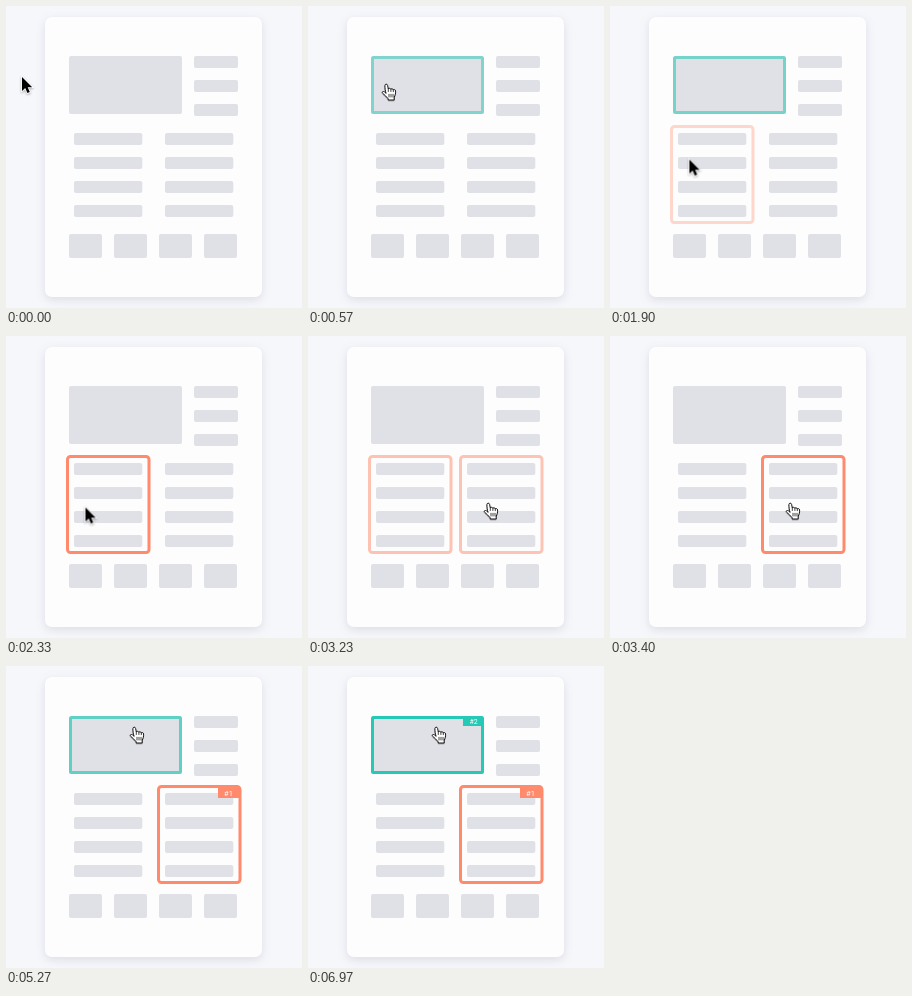
Animation of 296 by 302 pixels, one loop 7030 ms. Source, as an HTML page:

```html
<!DOCTYPE html>
<html lang="en">
<head>
<meta charset="utf-8">
<title>Selecting page blocks</title>
<style>
  html, body { margin: 0; width: 100%; height: 100%; overflow: hidden; background: #f6f7fb; }
  svg { display: block; width: 296px; height: 302px; }
  .card { fill: #fdfdfd; filter: drop-shadow(0 3px 5px rgba(60, 65, 85, .13)); }
  .block { fill: #e0e1e7; }
  .outline { fill: none; stroke-width: 3; opacity: 0; }
  .orange { stroke: #ff8a6c; }
  .teal { stroke: #25c9b5; }
  .tag { opacity: 0; }
  .tag text { fill: #fff; font-family: Roboto, Arial, sans-serif; text-anchor: middle; }
  #arrow { filter: drop-shadow(0 1px 1px rgba(0, 0, 0, .3)); }
  #hand { opacity: 0; filter: drop-shadow(0 1px .7px rgba(0, 0, 0, .25)); }
</style>
</head>
<body>
<svg viewBox="0 0 296 302">
  <rect class="card" x="39" y="11" width="217" height="280" rx="7"/>
  <g id="blocks"></g>

  <rect id="leftList" class="outline orange" x="61.5" y="120.5" width="81.5" height="96" rx="3"/>
  <rect id="rightList" class="outline orange" x="152.5" y="120.5" width="81.5" height="96" rx="3"/>
  <rect id="hero" class="outline teal" x="64.5" y="51.5" width="110" height="55" rx="1"/>

  <g id="firstTag" class="tag">
    <rect x="212" y="121" width="21" height="11" fill="#ff8a6c"/>
    <text x="222.5" y="130" font-size="7.5">#1</text>
  </g>
  <g id="secondTag" class="tag">
    <rect x="155" y="52" width="19" height="8" fill="#25c9b5"/>
    <text x="165.5" y="58.3" font-size="7">#2</text>
  </g>

  <g id="cursor">
    <path id="arrow" d="M0 0V14L3.2 11L5.4 16L7.8 15L5.7 10.2H10.2Z"
      stroke="#fff" stroke-width="1.6" paint-order="stroke"/>
    <g id="hand" stroke="#111" stroke-linejoin="round" stroke-linecap="round">
      <g transform="translate(-6 -1)">
        <path fill="#fff" d="M5 10C4 7.5 4 5 3.9 2.6C3.9 .8 6.3 .6 6.6 2.4L7.3 6C7.6 5 9.5 5 9.9 6.3
          C10.3 5.4 12 5.6 12.3 6.9C13 6.1 14.5 6.6 14.6 8C14.8 10.5 14 12.5 13.2 14V17H7.2V15.8
          C5.8 14.2 3.9 12 1.6 10.2C.6 9.2 1.6 8 3 8.6Z"/>
        <path fill="none" stroke-width=".8" d="M7.3 6V8.5M9.9 6.3V8.5M12.3 6.9V8.7M8 11.3V14M10 11.3V14M12 11.3V14"/>
      </g>
    </g>
  </g>
</svg>
<script>
  const LOOP = 7030;
  const byId = id => document.getElementById(id);

  function addBlocks(xs, ys, width, height) {
    for (const x of xs) for (const y of ys) {
      const rect = document.createElementNS('http://www.w3.org/2000/svg', 'rect');
      const box = { class: 'block', x, y, width, height, rx: 2 };
      for (const name in box) rect.setAttribute(name, box[name]);
      byId('blocks').append(rect);
    }
  }
  addBlocks([63], [50], 113, 58);
  addBlocks([188], [50, 74, 98], 44, 12);
  addBlocks([68, 159], [127, 151, 175, 199], 68.3, 12);
  addBlocks([63, 108, 153, 198], [228], 33, 24);

  // Each step is [time in ms, value]; two steps at one time make a hard change.
  function play(id, property, steps, easing = 'linear') {
    const all = [[0, steps[0][1]], ...steps, [LOOP, steps[steps.length - 1][1]]];
    const frames = all.map(([time, value]) => ({ offset: time / LOOP, [property]: value, easing }));
    byId(id).animate(frames, { duration: LOOP, iterations: Infinity }).startTime = 0;
  }
  const at = (x, y) => `translate(${x}px, ${y}px)`;
  const show = (id, ...steps) => play(id, 'opacity', steps);
  const swap = (first, times) => times.flatMap((time, i) => {
    const before = (i + first) % 2;
    return [[time, before], [time, 1 - before]];
  });

  play('cursor', 'transform', [
    [120, at(16, 71)], [520, at(79, 78)],
    [1720, at(79, 78)], [1980, at(79.5, 171.5)],
    [2980, at(79.5, 171.5)], [3210, at(181, 167)],
    [4950, at(181, 167)], [5220, at(129, 61)]
  ], 'ease-in-out');

  const switches = [410, 1800, 3110];
  show('arrow', ...swap(1, switches));
  show('hand', ...swap(0, switches));

  show('hero', [420, 0], [720, 1], [1770, 1], [2070, 0], [5060, 0], [5370, 1]);
  show('leftList', [1800, 0], [2100, 1], [3080, 1], [3390, 0]);
  show('rightList', [3080, 0], [3390, 1]);
  show('firstTag', [4630, 0], [4630, 1]);
  show('secondTag', [6380, 0], [6530, 1]);
</script>
</body>
</html>
```
